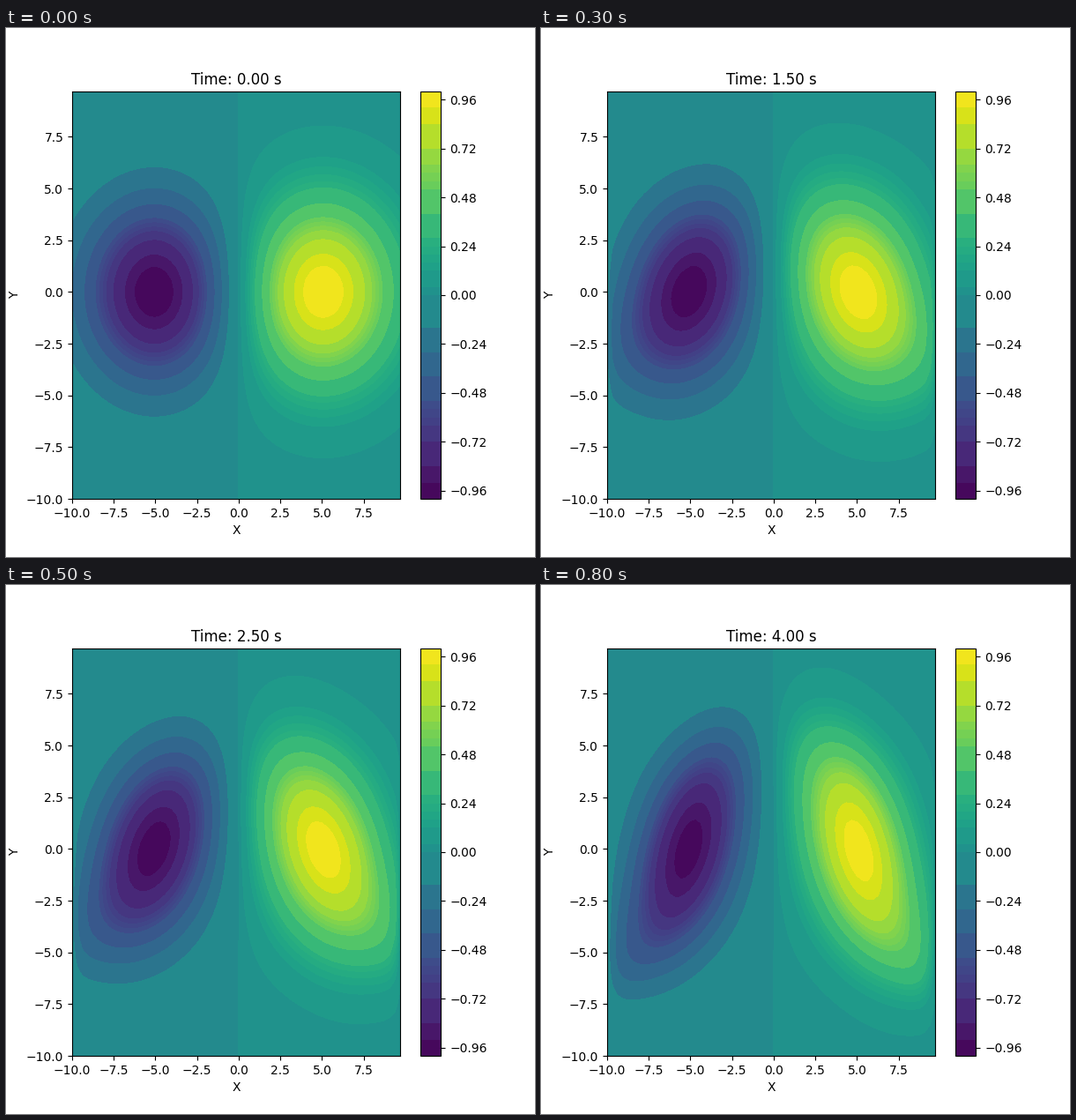
Animation of 600x600 px, one loop 900 ms. Source, as a matplotlib script:

```python
import numpy as np
import matplotlib.pyplot as plt
from matplotlib.animation import FuncAnimation
from matplotlib.colors import ListedColormap

N, SIZE = 64, 20.0
STEP = SIZE / N
FRAMES, FRAME_TIME, SUBSTEPS = 9, 0.5, 10
DRIFT, VISCOSITY = 0.74, 0.02

axis = -SIZE / 2 + STEP * np.arange(N)
X, Y = np.meshgrid(axis, axis)
k = 2 * np.pi * np.fft.fftfreq(N, STEP)
KX, KY = np.meshgrid(k, k)
K2 = KX**2 + KY**2
K2[0, 0] = 1.0


def diff(f, ax):
    """Periodic central difference."""
    return (np.roll(f, -1, ax) - np.roll(f, 1, ax)) / (2 * STEP)


def laplacian(f):
    near = sum(np.roll(f, s, ax) for s in (-1, 1) for ax in (0, 1))
    return (near - 4 * f) / STEP**2


def rate(w):
    """Change of the field as it is carried by its own flow."""
    psi = -np.fft.fft2(w) / K2
    psi[0, 0] = 0
    u = DRIFT * np.fft.ifft2(1j * KY * psi).real
    v = -DRIFT * np.fft.ifft2(1j * KX * psi).real
    return VISCOSITY * laplacian(w) - u * diff(w, 1) - v * diff(w, 0)


def advance(w, dt):
    a = rate(w)
    b = rate(w + dt / 2 * a)
    c = rate(w + dt / 2 * b)
    d = rate(w + dt * c)
    return w + dt / 6 * (a + 2 * b + 2 * c + d)


def blob(cx):
    return np.exp(-((X - cx) ** 2 + Y**2) / 20)


def simulate():
    w = blob(5) - blob(-5)
    states = [w]
    for _ in range(FRAMES - 1):
        for _ in range(SUBSTEPS):
            w = advance(w, FRAME_TIME / SUBSTEPS)
        states.append(w)
    return states


def band_colors():
    """Fifty viridis slots, with neighbours joined into wider flat bands."""
    shared = [0.28, 0.40, 0.52, 0.56, 0.60, 0.64, 0.72, 0.84, 0.92, 1.0]
    edges = [-e for e in reversed(shared)] + [-0.16, 0, 0.04, 0.12, 0.16, 0.20, 0.24] + shared
    colors = []
    for lo, hi in zip(edges, edges[1:]):
        mid = -0.05 if hi == 0 else (lo + hi) / 2
        colors += [plt.cm.viridis((mid + 1) / 2)] * round((hi - lo) / 0.04)
    return ListedColormap(colors)


levels = np.round(np.linspace(-1, 1, 51), 2)
cmap = band_colors()
states = simulate()

fig, ax = plt.subplots(figsize=(6, 6), dpi=100)


def fill(i):
    return ax.contourf(X, Y, states[i], levels=levels, cmap=cmap, vmin=-1, vmax=1)


bands = fill(0)
fig.colorbar(bands, ax=ax, ticks=levels[1::6])
ax.set_xlabel("X")
ax.set_ylabel("Y")
title = ax.set_title("Time: 0.00 s")


def update(i):
    global bands
    bands.remove()
    bands = fill(i)
    title.set_text(f"Time: {i * FRAME_TIME:.2f} s")
    return [bands, title]


anim = FuncAnimation(fig, update, frames=FRAMES, interval=100, repeat=True,
                     repeat_delay=0, blit=False)
plt.show()
```
